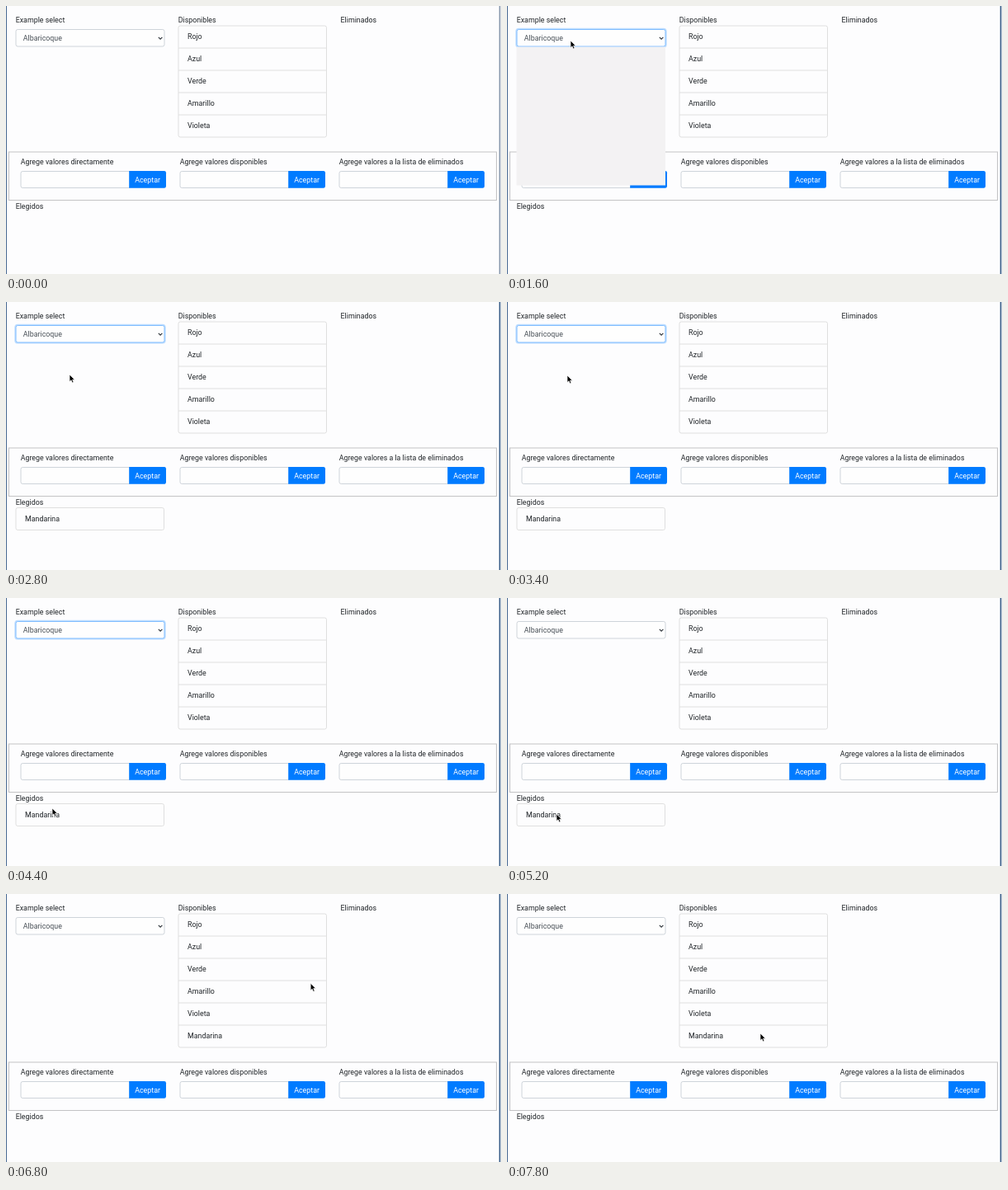
An HTML page for the animation above (8000 ms loop, 600 by 325 pixels).

```html
<!DOCTYPE html>
<html lang="es">
<head>
<meta charset="utf-8">
<style>
  html, body { margin: 0; width: 100%; height: 100%; overflow: hidden; background: #fdfdfe; }
  svg { display: block; width: 600px; height: 325px; }
  text { font: 8.85px Roboto, sans-serif; fill: #212529; white-space: pre; }
  .item { fill: none; stroke: #dfdfdf; }
  .field { fill: #fefefe; stroke: #ced4da; }
  .muted { fill: #495057; }
  .white { fill: #fff; }
</style>
</head>
<body>
<svg viewBox="0 0 600 325"></svg>
<script>
const LOOP = 8000, STEP = 200;
const COLORS = ['Rojo', 'Azul', 'Verde', 'Amarillo', 'Violeta'];
const FRUITS = ['Albaricoque', 'Cereza', 'Fresa', 'Mandarina', 'Manzana', 'Melocotón', 'Melón',
  'Naranja', 'Níspero', 'Pera', 'Piña', 'Plátano', 'Pomelo', 'Sandía', 'Uva'];
const PICKED = 'Mandarina';
const ITEM_H = 27, OPTION_H = 11.14, MENU_TOP = 49.5;

// time, x, y of the pointer tip
const POINTER = [
  [200, 330, 170], [1200, 77, 42], [1800, 77, 42], [2200, 77, 66], [2600, 77, 88], [3000, 77, 88],
  [3400, 73, 89], [3800, 38, 199], [4400, 56, 255], [5200, 60, 262], [5800, 481, 38],
  [6400, 481, 38], [7000, 330, 133], [7800, 307, 169]
];

const svg = document.querySelector('svg');

function add(parent, tag, attrs = {}, content = '') {
  const node = document.createElementNS('http://www.w3.org/2000/svg', tag);
  for (const key in attrs) node.setAttribute(key, attrs[key]);
  node.textContent = content;
  return parent.appendChild(node);
}
const group = parent => add(parent, 'g');
const rect = (parent, x, y, width, height, attrs) =>
  add(parent, 'rect', { x, y, width, height, ...attrs });
const text = (parent, x, y, content, attrs) => add(parent, 'text', { x, y, ...attrs }, content);
const show = (node, visible) => node.setAttribute('display', visible ? 'inline' : 'none');
const move = (node, x, y) => node.setAttribute('transform', `translate(${x} ${y})`);

function list(parent, x, y, names) {
  const g = group(parent);
  const height = names.length * ITEM_H;
  rect(g, x + .5, y + .5, 179.5, height, { class: 'item', rx: 2.2 });
  names.forEach((name, i) => {
    const top = y + i * ITEM_H;
    if (i) add(g, 'path', { class: 'item', d: `M${x + .5} ${top + .5}h179.5` });
    text(g, x + 11.5, top + 16.8, name);
  });
  return g;
}

// page edges
rect(svg, 0, 0, 1, 325, { fill: '#4a6a94' });
const rightEdge = rect(svg, 597.7, 0, 1.6, 325);

// top row
text(svg, 11.7, 20, 'Example select');
text(svg, 208.7, 20, 'Disponibles');
text(svg, 405.6, 20, 'Eliminados');
const focusRing = rect(svg, 11.2, 27.7, 181.6, 22, { fill: 'none', stroke: '#bfdeff', 'stroke-width': 1.8, rx: 3 });
const select = rect(svg, 12, 28.5, 180, 20.5, { class: 'field', rx: 2.2 });
text(svg, 20.8, 42.1, FRUITS[0], { class: 'muted' });
add(svg, 'path', { d: 'M184.8 37.8l2.3 2.4 2.3-2.4', fill: 'none', stroke: '#343a40', 'stroke-width': 1.2 });

const available = list(svg, 208.5, 23.5, COLORS);
const availableMore = list(svg, 208.5, 23.5, [...COLORS, PICKED]);
const removed = list(svg, 405.5, 23.5, [PICKED]);

// the part below, pushed down when the middle list grows
const lower = group(svg);
rect(lower, 3.5, 177, 591, 58.5, { fill: 'none', stroke: '#c3c3c5' });
['Agrege valores directamente', 'Agrege valores disponibles', 'Agrege valores a la lista de eliminados']
  .forEach((label, i) => {
    const x = 17.7 + i * 193;
    text(lower, x, 191.8, label);
    rect(lower, x + .3, 200.5, 133, 20, { class: 'field', rx: 2.2 });
    add(lower, 'path', {
      d: `M${x + 131.5} 200h42.6q2.2 0 2.2 2.2v16.3q0 2.2-2.2 2.2h-42.6z`, fill: '#007bff'
    });
    text(lower, x + 153.9, 213.7, 'Aceptar', { class: 'white', 'text-anchor': 'middle' });
  });
text(lower, 11.7, 245.5, 'Elegidos');
const chosen = list(lower, 11.5, 249, [PICKED]);

// drop-down
const blankMenu = rect(svg, 11.5, 49.5, 180.5, 168, { fill: '#f3f2f3' });
const menu = group(svg);
rect(menu, 12, MENU_TOP, 179.5, 167.8, { fill: '#fefefe', stroke: '#6b7177' });
const highlight = rect(menu, 12.5, 0, 178.5, OPTION_H - .5, { fill: '#1e90ff', stroke: '#0b1520' });
const options = FRUITS.map((name, i) => text(menu, 20.8, 58.2 + i * OPTION_H, name));

const pointer = add(svg, 'path', {
  d: 'M0 0V8.6L2 6.8 3.4 10 5 9.3 3.6 6.2H6.3Z',
  fill: '#000', stroke: '#fff', 'stroke-width': .7
});

function pointerAt(t) {
  const next = POINTER.findIndex(key => key[0] >= t);
  if (next <= 0) return POINTER[0].slice(1);
  const [t0, x0, y0] = POINTER[next - 1], [t1, x1, y1] = POINTER[next];
  const p = (t - t0) / (t1 - t0), ease = p * p * (3 - 2 * p);
  return [x0 + (x1 - x0) * ease, y0 + (y1 - y0) * ease];
}

function draw(now) {
  const t = Math.floor(now % LOOP / STEP) * STEP;
  const between = (from, to) => t >= from && t < to;
  const [x, y] = pointerAt(t);
  const focused = between(1600, 4800), grown = t >= 6800;

  show(pointer, t >= 200);
  move(pointer, x, y);
  rightEdge.setAttribute('fill', t < 1600 ? '#8495aa' : '#345985');

  show(focusRing, focused);
  select.style.stroke = focused ? '#80bdff' : '';
  show(blankMenu, between(1600, 1800));
  show(menu, between(1800, 2800));
  const row = Math.max(0, Math.floor((y - MENU_TOP) / OPTION_H));
  highlight.setAttribute('y', MENU_TOP + .5 + row * OPTION_H);
  options.forEach((option, i) => option.setAttribute('class', i === row ? 'white' : 'muted'));

  show(chosen, between(2800, 5600));
  show(removed, between(5600, 6800));
  show(available, !grown);
  show(availableMore, grown);
  move(lower, 0, grown ? ITEM_H : 0);
}

const start = performance.now();
function tick() {
  draw(performance.now() - start);
  requestAnimationFrame(tick);
}
tick();
</script>
</body>
</html>
```
